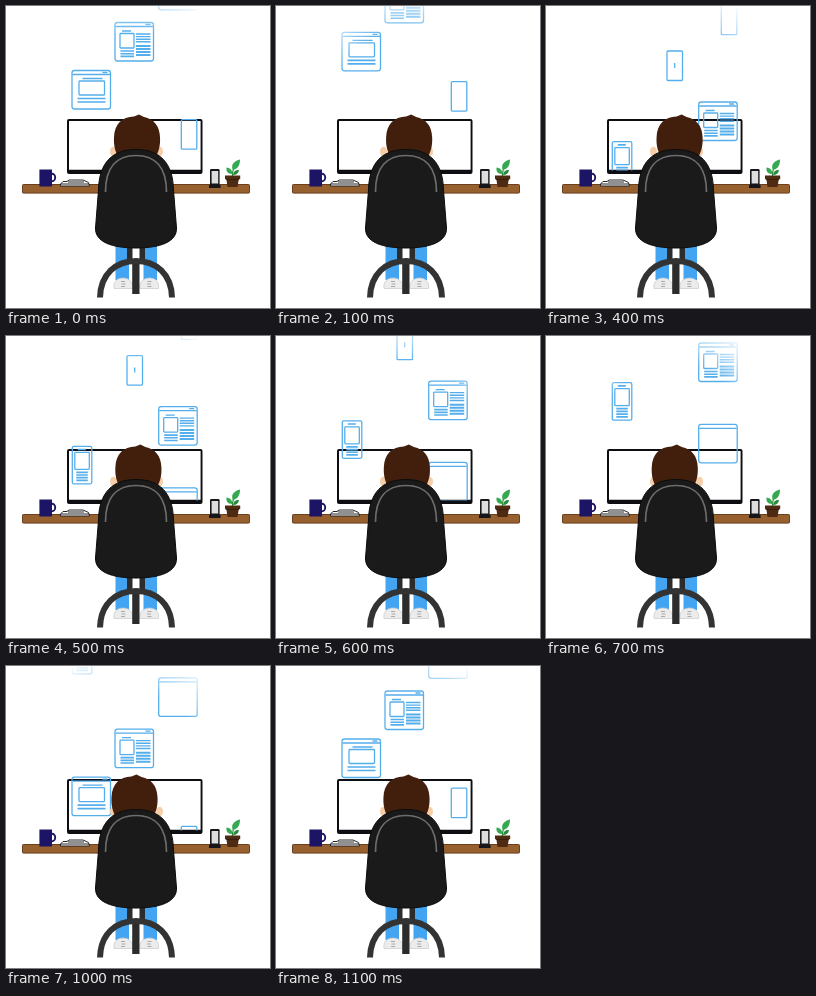
Animation of 264x302 px, one loop 1200 ms. Source, as an HTML page:

```html
<!DOCTYPE html>
<html lang="en">
<head>
<meta charset="utf-8">
<title>Busy desk</title>
<style>
html, body { margin: 0; width: 100%; height: 100%; overflow: hidden; background: #fff; }
svg { display: block; width: 264px; height: 302px; }
</style>
</head>
<body>
<svg viewBox="0 0 264 302">
  <defs>
    <radialGradient id="fade" gradientUnits="userSpaceOnUse" cx="128" cy="95" r="112">
      <stop offset=".62" stop-color="#fff" stop-opacity="0"/>
      <stop offset=".76" stop-color="#fff" stop-opacity=".4"/>
      <stop offset="1" stop-color="#fff" stop-opacity=".95"/>
    </radialGradient>
    <clipPath id="above"><path d="M0 0H264V164.5H0Z"/></clipPath>
  </defs>

  <!-- desk and monitor -->
  <rect x="16.5" y="178.5" width="227" height="8.6" rx=".8" fill="#96602f" stroke="#6a3f1e"/>
  <rect x="61" y="113" width="135.5" height="55" rx="2" fill="#0d0d12"/>
  <path d="M63 115H194.6V163.8H63Z" fill="#fff"/>

  <!-- things on the desk -->
  <ellipse cx="46" cy="171.5" rx="3.2" ry="3.8" fill="none" stroke="#1c1464" stroke-width="1.9"/>
  <path d="M33.4 163.5H46V180.5H33.4Z" fill="#1c1464"/>
  <path d="M54.5 178L57 175.5H61L63 174H77L82.5 176.5L83.5 180H54.5Z" fill="#fff" stroke="#222"/>
  <path d="M55 178H83M62 176H78" stroke="#222"/>
  <path d="M203 179H214.6V182H203Z" fill="#16161a"/>
  <rect x="204" y="163" width="9.6" height="17.5" rx="1.3" fill="#16161a"/>
  <path d="M205.6 165H212.2V177.5H205.6Z" fill="#dedede"/>
  <path d="M226.5 170Q226 164 230 159" fill="none" stroke="#278a3c" stroke-width="1.2"/>
  <path d="M226.7 164C224.500 157.500 229 155 234 153.500C234 159 232 163 226.700 164Z" fill="#35a952"/>
  <path d="M226.2 168C221 168 220 165 220.600 161.500C224.500 162 226.500 164.500 226.200 168Z" fill="#35a952"/>
  <path d="M227 169C227.500 165 230 163.500 233 164C232.500 167.500 230.500 169 227 169Z" fill="#278a3c"/>
  <path d="M219 169.500H234.200V173.300H232.800L231.500 181H221.500L220.400 173.300H219Z" fill="#4f2a13"/>
  <path d="M220 173.500H233" stroke="#341a0a" stroke-width=".8"/>

  <g id="pages" clip-path="url(#above)" fill="none" stroke="#55aeec" stroke-width="1.3"></g>
  <path d="M0 0H264V95H0Z" fill="url(#fade)"/>

  <!-- person -->
  <ellipse cx="107.500" cy="145.500" rx="3.500" ry="4.800" fill="#f6cfaa"/>
  <ellipse cx="153.500" cy="145.500" rx="3.500" ry="4.800" fill="#f6cfaa"/>
  <path id="hair" fill="#421f0c" d="M113 152C109 146 107.500 139 108 131C108.500 118 116 111 128 110.500L133 108.500L138 111C148 113 153.500 120 154 131C154.500 139 153 146 149 152Z"/>
  <path d="M109.500 240H123V274H109.500ZM137.500 240H151V274H137.500Z" fill="#43a5f2"/>
  <g id="shoe">
    <path d="M108 282.500C107 276 111 272 117 272S127.500 276 126.500 282.500Z" fill="#ececec" stroke="#c9c9c9" stroke-width=".7"/>
    <path d="M115 275.500H119M115.500 278H119.500M115 280.500H119" stroke="#999" stroke-width=".8"/>
  </g>
  <use href="#shoe" transform="matrix(-1 0 0 1 260.500 0)"/>

  <!-- chair -->
  <path d="M121 240H126.500V256H121ZM133.500 240H139V256H133.500ZM126.200 253H133.500V288H126.200Z" fill="#2c2c2c"/>
  <path d="M94 291.500C94.500 268 110 255 130 255S165.500 268 166 291.500" fill="none" stroke="#333" stroke-width="6"/>
  <path d="M92.500 184C93 156 107 143.500 130 143.500S167 156 167.500 184L170.500 222C171 236 154 242 130 242S89 236 89.500 222Z" fill="#1a1a1a" stroke="#0c0c0c"/>
  <path d="M99.500 186C99.500 161 111 149.500 130 149.500S160.500 161 160.500 186" fill="none" stroke="#6d6d6d" stroke-width="1.700"/>
</svg>

<script>
const period = 326.5, unit = 12.72;
// Distance travelled, in units, for each 100 ms pose
const travel = [0, 3, 4, 6, 9, 11, 13, 16, 18, 20, 22, 25];

const box = (x, y, w, h, r = 0.8) =>
  `<rect x="${x}" y="${y}" width="${w}" height="${h}" rx="${r}"/>`;
const line = (x, y, w, weight = 1.3) =>
  `<path d="M${x} ${y}h${w}" stroke-width="${weight}"/>`;
const rows = (x, y, w, count, gap, weight) =>
  Array.from({ length: count }, (_, i) => line(x, y + i * gap, w, weight)).join('');

const frame = box(0.5, 0.5, 38.5, 38.5, 2.5) + line(1, 4.5, 37.5);
const dots = line(31, 2.5, 5, 1.4);
const article = frame + dots + line(7.5, 9, 9) + box(5.5, 11.5, 14, 14.5) +
  rows(21.5, 12, 14.5, 4, 2.6, 1.4) + rows(21.5, 24, 14.5, 4, 3, 2) + rows(6, 29, 13.5, 3, 2.7, 1.6);
const banner = frame + dots + line(11, 8.5, 20) + box(7.5, 11, 25.5, 14) + rows(6, 28.5, 28, 2, 3.5, 1.7);
const phone = box(0.5, 0.5, 15.5, 29.5, 1);
const mobile = box(0.5, 0.5, 19.5, 37.5, 1.5) + line(6, 3.7, 8, 1.6) +
  box(3, 6.5, 14.5, 17) + rows(4.5, 26.5, 11.5, 4, 2.7, 1.7);

const pages = [
  [108.5, 16, article],
  [65.5, 64, banner],
  [174.8, 113.2, phone],
  [120.5, 159, phone + '<path d="M8.2 12.5v5"/>'],
  [152.2, 210, article],
  [65.8, 249.7, mobile],
  [152.2, 291.3, frame],
];

const layer = document.getElementById('pages');
const hair = document.getElementById('hair');
layer.innerHTML = pages.map(page => `<g>${page[2]}</g>`).join('');

function draw() {
  const pose = Math.floor(performance.now() / 100) % travel.length;
  const shift = travel[pose] * unit;
  pages.forEach(([x, y], i) => {
    const top = (y - shift + 40 + period * 2) % period - 40;
    layer.children[i].setAttribute('transform', `translate(${x} ${top})`);
  });
  const sway = 3.2 * Math.sin(2 * Math.PI * shift / period);
  hair.setAttribute('transform', `translate(${sway} 0)`);
  requestAnimationFrame(draw);
}
draw();
</script>
</body>
</html>
```
